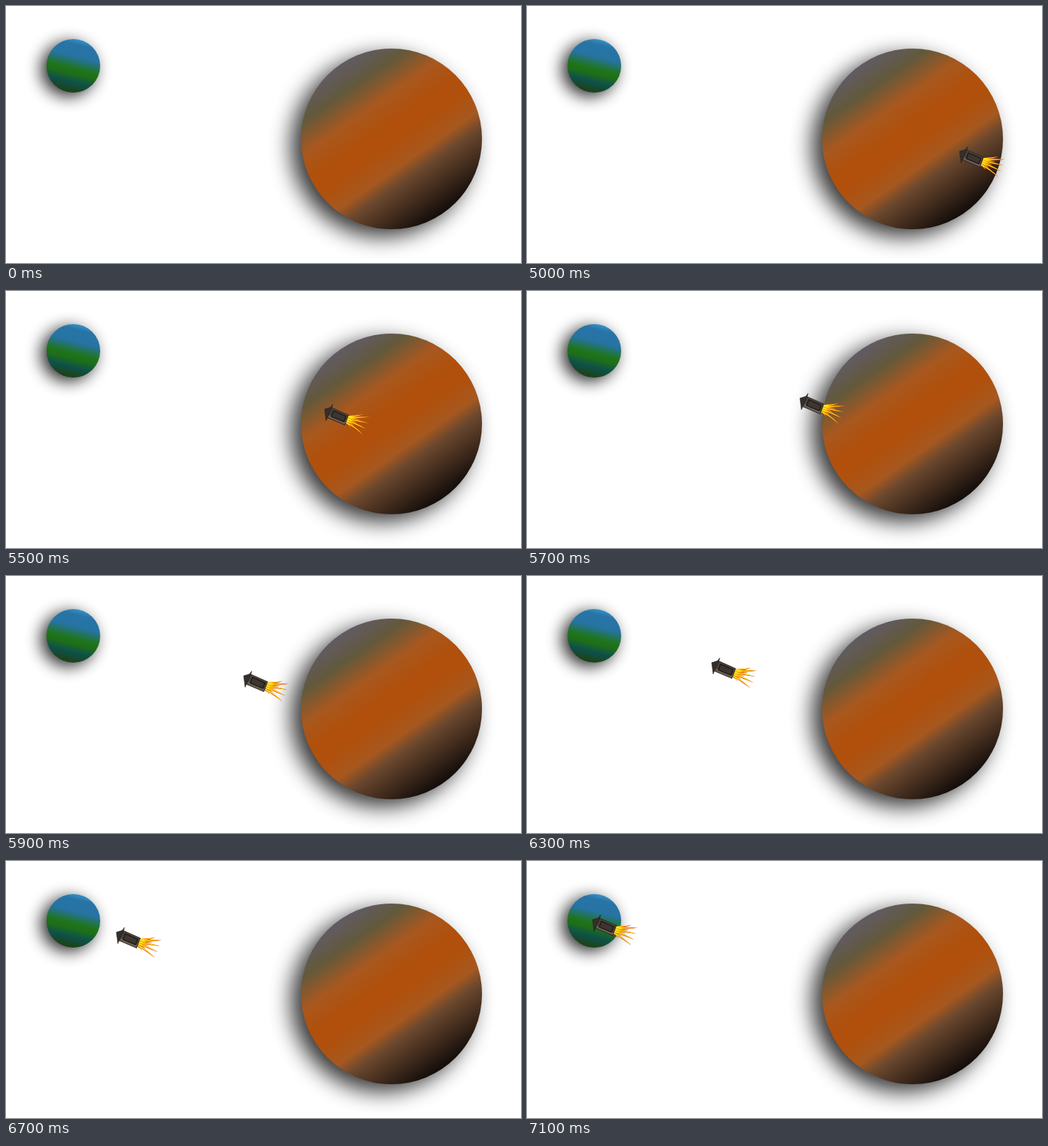
These frames come from a looping animation (700 by 350 pixels, 7.2 s). An HTML page:

```html
<!DOCTYPE html>
<html lang="en">
<head>
<meta charset="utf-8">
<title>Rocket between planets</title>
<style>
  html, body { margin: 0; width: 100%; height: 100%; overflow: hidden; background: #fff; }
  svg { display: block; }
  #rocket { visibility: hidden; }
</style>
</head>
<body>
<svg width="700" height="350" viewBox="0 0 700 350">
  <defs>
    <linearGradient id="sea" x1="0" x2="1" y1=".5" y2=".5" gradientTransform="rotate(104 .5 .5)">
      <stop offset="0" stop-color="#3492c8"/>
      <stop offset=".1" stop-color="#2874a6"/>
      <stop offset=".32" stop-color="#2673a4"/>
      <stop offset=".55" stop-color="#1f7418"/>
      <stop offset=".65" stop-color="#1e6d1b"/>
      <stop offset=".8" stop-color="#0d514a"/>
      <stop offset=".96" stop-color="#1c431c"/>
    </linearGradient>
    <linearGradient id="rust" x1="0" x2="1" y1=".5" y2=".5" gradientTransform="rotate(55 .5 .5)">
      <stop offset="0" stop-color="#615b64"/>
      <stop offset=".14" stop-color="#62593c"/>
      <stop offset=".29" stop-color="#a8581f"/>
      <stop offset=".42" stop-color="#b0500c"/>
      <stop offset=".52" stop-color="#b0500c"/>
      <stop offset=".65" stop-color="#a6581f"/>
      <stop offset=".73" stop-color="#6b482e"/>
      <stop offset="1" stop-color="#120c0a"/>
    </linearGradient>
    <filter id="soft" x="-50%" y="-50%" width="200%" height="200%"><feGaussianBlur stdDeviation="11"/></filter>
    <filter id="softer" x="-50%" y="-50%" width="200%" height="200%"><feGaussianBlur stdDeviation="15"/></filter>
  </defs>

  <circle cx="84.5" cy="86.5" r="36.5" opacity=".85" filter="url(#soft)"/>
  <circle cx="91.5" cy="81.5" r="36.5" fill="url(#sea)"/>
  <circle cx="511" cy="191" r="123" opacity=".8" filter="url(#softer)"/>
  <circle cx="524" cy="181" r="123" fill="url(#rust)"/>

  <g id="rocket">
    <g id="flames"></g>
    <path d="M28 17L32 15L28 28L26 26Z" fill="#d9cf9a"/>
    <path d="M9 4.5L32.5 15L27.5 28.5L4 18.5Z" fill="#4b4139" stroke="#28221e" stroke-width=".8"/>
    <path d="M5 18L27 27.5L28 24.5L6 15Z" fill="#6d6156"/>
    <path d="M12 9L29 16.5L26 24L9 17Z" fill="#3d3530" stroke="#171412" stroke-width="1.1"/>
    <path d="M0 7L8 4.5L11 .5L9.5 6L4 18L2 22.5L1.5 18Z" fill="#352f2b" stroke="#211e1c" stroke-width=".6"/>
  </g>
</svg>
<script>
const LOOP = 7200, STEP = 100, LAUNCH = 5000, TONGUES = 9;
const rocket = document.getElementById('rocket');

// steps since launch, x, y
const course = [
  [0, 588, 190.5], [7, 371, 139], [9, 323, 128.5], [13, 251, 110.5],
  [15, 208, 103], [17, 150, 90], [21, 89, 72.5]
];
const mix = (a, b, k) => a + (b - a) * k;

// A fan of thin curved tongues, alternately long and short.
function tongue(i, width, drop) {
  const k = i / (TONGUES - 1);
  const angle = mix(-6, 42, k) * Math.PI / 180;
  const length = i % 2 ? 30 : mix(21, 10, k);
  const x = mix(32, 28, k), y = mix(16.5, 25.5, k);
  const dx = length * Math.cos(angle), dy = length * Math.sin(angle);
  const bend = mix(1.5, -3, k);
  const side = w => `${x + dx / 2} ${y + dy / 2 + bend + w + drop}`;
  return `M${x} ${y - width / 2}Q${side(-width)} ${x + dx} ${y + dy}` +
         `Q${side(width)} ${x} ${y + width / 2}Z`;
}

function fan(color, width, drop) {
  let d = '';
  for (let i = 0; i < TONGUES; i++) d += tongue(i, width, drop);
  return `<path fill="${color}" d="${d}"/>`;
}

document.getElementById('flames').innerHTML = fan('#d01808', 1.6, .6) + fan('#ffe312', 1.2, -.3);

function place(t) {
  const step = Math.floor((t - LAUNCH) / STEP);
  rocket.style.visibility = step < 0 ? 'hidden' : 'visible';
  if (step < 0) return;
  const next = Math.max(1, course.findIndex(p => p[0] >= step));
  const [s0, x0, y0] = course[next - 1], [s1, x1, y1] = course[next];
  const k = (step - s0) / (s1 - s0);
  rocket.setAttribute('transform',
    `translate(${Math.round(mix(x0, x1, k))} ${Math.round(mix(y0, y1, k))})`);
}

const start = performance.now();
function frame() {
  place((performance.now() - start) % LOOP);
  requestAnimationFrame(frame);
}
frame();
</script>
</body>
</html>
```
